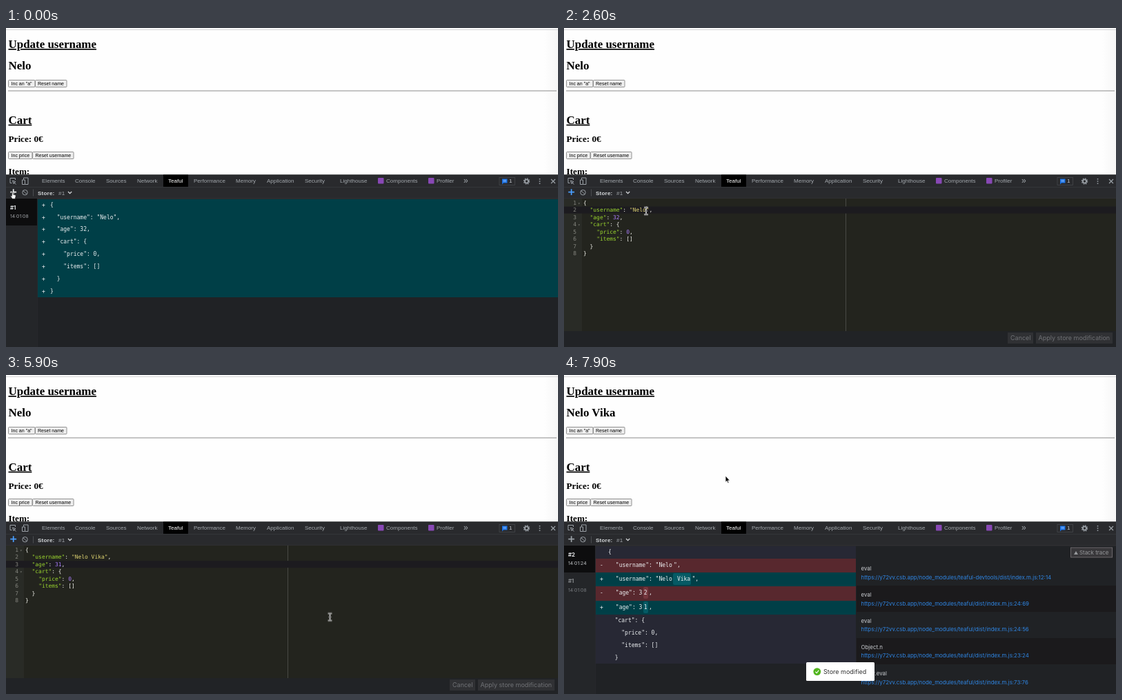
Recreate the animation shown at these times as an HTML page. Size 800 by 462 pixels, loop 8 s.

```html
<!DOCTYPE html>
<html lang="en">
<head>
<meta charset="utf-8">
<title>Store devtools</title>
<style>
html, body { margin: 0; width: 100%; height: 100%; overflow: hidden; background: #202124; }
#stage { position: relative; width: 800px; height: 462px; overflow: hidden; background: linear-gradient(90deg, #fefefe 780px, #f6f6f6); }
svg, .view { position: absolute; left: 0; top: 0; width: 800px; height: 462px; }

.page { font: bold 16.95px "Liberation Serif", serif; fill: #000; }
.u { text-decoration: underline; }
.page .h3 { font-size: 13.2px; }
.btn { font: 7.05px "Liberation Sans", sans-serif; }
.btn rect { fill: #efefef; stroke: #767676; stroke-width: .8; }
.tabs { font: 8.05px "Liberation Sans", sans-serif; fill: #a3a8ad; }
.ui { font: 7.9px Inter, sans-serif; }
.icon { fill: none; stroke: #9aa0a6; }

/* every timeline lasts one loop */
.t { animation: 8s step-end infinite; }
.editor { animation-name: editor; }
.before { animation-name: before; }
.after { animation-name: after; }
.saved { animation-name: saved; }
.add { animation-name: add; }
@keyframes editor { 0% { opacity: 0 } 11.25% { opacity: 1 } 90% { opacity: 0 } }
@keyframes before { 0% { opacity: 1 } 11.25% { opacity: 0 } 90% { opacity: 1 } 93.75% { opacity: 0 } }
@keyframes after { 0% { opacity: 0 } 93.75% { opacity: 1 } }
@keyframes saved { 0% { fill-opacity: 0 } 90% { fill-opacity: 1 } }
@keyframes add { 0% { stroke: #f1f3f4 } 11.25% { stroke: #4a9eff } 90% { stroke: #9aa0a6 } }

/* code editor */
.view { font: 8px "DejaVu Sans Mono", monospace; white-space: pre; }
.view.editor { font-size: 7.94px; }
.view > div { position: absolute; }
.bg { left: 0; top: 247px; width: 800px; height: 192px; background: linear-gradient(90deg, #292b26 26px, #23241e 0); }
.foot { left: 0; top: 439px; width: 800px; height: 23px; background: #212326; }
.margin { left: 408px; top: 247px; width: 1px; height: 192px; background: #484945; }
.nums, .code, .fold { top: 248.5px; line-height: 10.55px; }
.line, .caret { top: 247.7px; height: 10.55px; }
.nums { left: 0; width: 18px; text-align: right; color: #85867f; }
.fold { left: 20px; color: #6d6e68; font-size: 6px; }
.code { left: 28px; color: #f0f0ea; }
.code i { font-style: normal; color: #9bd62f; }
.code em { font-style: normal; color: #e0d572; }
.code u { text-decoration: none; color: #a97dfa; }
.cut { display: inline-block; overflow: hidden; vertical-align: top; height: 10.55px; }
.line { left: 0; width: 800px; background: #1c1b1f; animation-name: line; }
@keyframes line {
  0% { transform: translateY(73.85px) }
  31.25% { transform: translateY(10.55px) }
  56.25% { transform: translateY(21.1px) }
}
.caret { left: 28px; width: 1px; background: #f8f8f0; animation-name: caret, blink; }
@keyframes caret {
  0% { transform: translate(1ch, 73.85px) }
  31.25% { transform: translate(19ch, 10.55px) }
  35% { transform: translate(20ch, 10.55px) }
  37.5% { transform: translate(21ch, 10.55px) }
  40% { transform: translate(22ch, 10.55px) }
  42.5% { transform: translate(23ch, 10.55px) }
  45% { transform: translate(24ch, 10.55px) }
  56.25% { transform: translate(11ch, 21.1px) }
  61.25% { transform: translate(10ch, 21.1px) }
  66.25% { transform: translate(11ch, 21.1px) }
}
@keyframes blink {
  0% { opacity: 1 } 17.5% { opacity: 0 } 23.75% { opacity: 1 }
  30% { opacity: 0 } 31.25% { opacity: 1 } 51.25% { opacity: 0 }
  56.25% { opacity: 1 } 72.5% { opacity: 0 } 78.75% { opacity: 1 } 85% { opacity: 0 }
}
.typed { animation-name: typed; }
@keyframes typed {
  0%, 32.5% { width: 0; animation-timing-function: steps(5, end) }
  45%, 100% { width: 5ch }
}
.old { animation-name: old; }
.new { animation-name: new; }
@keyframes old { 0% { width: 1ch } 61.25% { width: 0 } }
@keyframes new { 0% { width: 0 } 66.25% { width: 1ch } }

/* diff */
.diff { left: 46px; top: 247.7px; width: 754px; color: #eceff1; }
.after .diff { width: 377px; }
.diff div { height: 17.85px; line-height: 17.85px; background: #272834; }
.diff b { display: inline-block; box-sizing: border-box; width: 18px; padding-left: 6px; font-weight: normal; }
.diff .plus { background: #003f47; }
.diff .w { height: 20.4px; line-height: 20.4px; }
.diff .minus { background: #58282e; }
.w span { padding: 4px 1.2px; border-radius: 2px; }
.plus .hi { background: #055a64; }
.minus .hi { background: #74363d; }

/* toast and pointer */
.toast { animation: toast 8s infinite; }
@keyframes toast {
  0%, 95% { opacity: 0; transform: translateY(14px); animation-timing-function: steps(2, end) }
  97.5%, 99.99% { opacity: 1; transform: none }
  100% { opacity: 0 }
}
.mouse { animation: move 8s infinite; }
@keyframes move {
  0%, 22.5% { transform: translate(10px, 242px); animation-timing-function: steps(5, end) }
  28.75%, 45% { transform: translate(119px, 265px); animation-timing-function: steps(3, end) }
  48.75%, 53.75% { transform: translate(92px, 274px); animation-timing-function: steps(2, end) }
  56.25%, 67.5% { transform: translate(84px, 275px); animation-timing-function: steps(5, end) }
  73.75% { transform: translate(469.5px, 350.5px); animation-timing-function: steps(3, end) }
  77.5% { transform: translate(560px, 399px); animation-timing-function: steps(4, end) }
  82.5%, 92.5% { transform: translate(719px, 456px); animation-timing-function: steps(5, end) }
  98.75%, 100% { transform: translate(236px, 151px) }
}
.hand { animation-name: hand; }
.beam { animation-name: beam; }
.arrow { animation-name: arrow; }
@keyframes hand { 0% { opacity: 1 } 23.75% { opacity: 0 } 81.25% { opacity: 1 } 90% { opacity: 0 } }
@keyframes beam { 0% { opacity: 0 } 23.75% { opacity: 1 } 78.75% { opacity: 0 } }
@keyframes arrow { 0% { opacity: 0 } 78.75% { opacity: 1 } 81.25% { opacity: 0 } 90% { opacity: 1 } }
</style>
</head>
<body>
<div id="stage">

<svg viewBox="0 0 800 462">
  <path d="M0 2.5H800" stroke="#d4d4d6"/>
  <g class="page">
    <text class="u" x="3.5" y="29">Update username</text>
    <text x="3.5" y="59.7" xml:space="preserve">Nelo<tspan class="t saved"> Vika</tspan></text>
    <text class="u" x="3.5" y="138.7">Cart</text>
    <text class="h3" x="3.5" y="165">Price: 0€</text>
    <text class="h3" x="3.5" y="211.5">Item:</text>
  </g>
  <path d="M3 91H798" stroke="#8b8b8b"/>
  <g class="btn">
    <rect x="3.5" y="75.5" width="38.5" height="10" rx="1"/><text x="7.5" y="83">Inc an "a"</text>
    <rect x="42.5" y="75.5" width="45.5" height="10" rx="1"/><text x="46" y="83">Reset name</text>
    <rect x="3.5" y="179.5" width="34.5" height="10" rx="1"/><text x="7.5" y="187">Inc price</text>
    <rect x="38.5" y="179.5" width="59.5" height="10" rx="1"/><text x="42.5" y="187">Reset username</text>
  </g>

  <rect y="212.5" width="800" height="249.5" fill="#202225"/>
  <rect y="212.5" width="800" height="34.5" fill="#292a2d"/>
  <path d="M0 230.5H800M0 247H800" stroke="#3a3b3e" stroke-width=".7"/>
  <rect x="228" y="212.5" width="36" height="17.5" fill="#000"/>
  <g class="tabs">
    <text x="52" y="224.4">Elements</text>
    <text x="100" y="224.4">Console</text>
    <text x="145" y="224.4">Sources</text>
    <text x="190" y="224.4">Network</text>
    <text x="235" y="224.4" fill="#fff">Teaful</text>
    <text x="272" y="224.4">Performance</text>
    <text x="333" y="224.4">Memory</text>
    <text x="378" y="224.4">Application</text>
    <text x="433" y="224.4">Security</text>
    <text x="484" y="224.4">Lighthouse</text>
    <text x="551" y="224.4">Components</text>
    <text x="624" y="224.4">Profiler</text>
    <text x="663" y="225" font-size="12">»</text>
    <text x="729" y="224.4" fill="#c6cacf">1</text>
    <text x="46" y="241.5" font-weight="bold" letter-spacing=".2" fill="#d5d8db">Store:</text>
    <text x="76" y="241.5" letter-spacing=".3">#1</text>
  </g>
  <g fill="#8848b5">
    <rect x="539" y="217" width="8.5" height="8.5" rx="1"/>
    <rect x="612" y="217" width="8.5" height="8.5" rx="1"/>
  </g>
  <rect x="715" y="216.5" width="22.5" height="11" fill="none" stroke="#45474b" stroke-width=".8"/>
  <path d="M719 218.5h7.5v6h-5.5l-2 2z" fill="#1a73e8"/>
  <path d="M720.5 220.5h4.5M720.5 222.3h4.5" stroke="#bcd6fb" stroke-width=".6"/>
  <g class="icon">
    <path d="M13.5 220v-2.5h-7.5v7h2.5M9.5 221l4.5 1.7-2 .9-.8 2zM12 224l2.5 2.5"/>
    <path d="M25.5 219.5v-2.5h6.5v9.5h-4M23.5 220h4v6.5h-4z"/>
    <circle cx="27.5" cy="238.2" r="3.7"/><path d="M25 235.7l5 5"/>
    <path d="M39.5 233.5v10" stroke="#4b4d51"/>
    <path d="M90 237l2.6 2.6 2.6-2.6" stroke="#d5d8db" stroke-width="1.3"/>
    <circle cx="754.5" cy="222" r="2.6" stroke-width="1.8"/>
    <circle cx="754.5" cy="222" r="4.1" stroke-width="1.2" stroke-dasharray="1.7 1.52"/>
    <path d="M773.5 218v1.6M773.5 221.2v1.6M773.5 224.4v1.6" stroke-width="1.6"/>
    <path d="M790 219l6 6M796 219l-6 6" stroke-width="1.2"/>
    <path class="t add" d="M10.7 233.3v8.8M6.3 237.7h8.8" stroke-width="1.7"/>
  </g>

  <rect y="247" width="45" height="215" fill="#242629"/>
  <path d="M45.5 247V462" stroke="#2c2e31" stroke-width=".6"/>
  <rect y="247" width="45" height="39" fill="#0d0d0e"/>
  <g class="ui t before">
    <text x="6" y="262.8" font-weight="bold" fill="#e4e6e8">#1</text>
    <text x="6" y="275.4" font-size="6.8" fill="#a4a7ab">14:01:08</text>
  </g>
  <g class="ui t after">
    <text x="6" y="262.8" font-weight="bold" fill="#e4e6e8">#2</text>
    <text x="6" y="275.4" font-size="6.8" fill="#c4c7ca">14:01:24</text>
    <text x="6" y="301" font-weight="bold" fill="#85888c">#1</text>
    <text x="6" y="313.7" font-size="6.8" fill="#7a7d81">14:01:08</text>
    <path d="M424 305h376v38H424zM424 381h376v38H424z" fill="#1b1a1c"/>
    <rect x="734.5" y="250" width="60" height="14" fill="#38373a" stroke="#6a666a"/>
    <path d="M739 260l3-5 3 5z" fill="#97999c"/>
    <text x="747" y="260.2" fill="#97999c">Stack trace</text>
    <g fill="#c9ccd0">
      <text x="430.5" y="282.8">eval</text>
      <text x="430.5" y="320.8">eval</text>
      <text x="430.5" y="358.5">eval</text>
      <text x="430.5" y="396.9">Object.n</text>
      <text x="430.5" y="434.9">Array.eval</text>
    </g>
    <g fill="#2f86e4">
      <text x="430.5" y="295.5">https://y72vv.csb.app/node_modules/teaful-devtools/dist/index.m.js:12:14</text>
      <text x="430.5" y="333.5">https://y72vv.csb.app/node_modules/teaful/dist/index.m.js:24:69</text>
      <text x="430.5" y="371">https://y72vv.csb.app/node_modules/teaful/dist/index.m.js:24:56</text>
      <text x="430.5" y="409.2">https://y72vv.csb.app/node_modules/teaful/dist/index.m.js:23:24</text>
      <text x="430.5" y="447.5">https://y72vv.csb.app/node_modules/teaful/dist/index.m.js:73:76</text>
    </g>
  </g>
</svg>

<div class="view t before"><div class="diff"><div class="plus"><b>+</b>{</div><div class="plus"><b>+</b>  "username": "Nelo",</div><div class="plus"><b>+</b>  "age": 32,</div><div class="plus"><b>+</b>  "cart": {</div><div class="plus"><b>+</b>    "price": 0,</div><div class="plus"><b>+</b>    "items": []</div><div class="plus"><b>+</b>  }</div><div class="plus"><b>+</b>}</div></div></div>

<div class="view t after"><div class="diff"><div><b> </b>{</div><div class="w minus"><b>-</b><span>  "username": "Nelo</span><span>",</span></div><div class="w plus"><b>+</b><span>  "username": "Nelo</span><span class="hi"> Vika</span><span>",</span></div><div class="w minus"><b>-</b><span>  "age": 3</span><span class="hi">2</span><span>,</span></div><div class="w plus"><b>+</b><span>  "age": 3</span><span class="hi">1</span><span>,</span></div><div><b> </b>  "cart": {</div><div><b> </b>    "price": 0,</div><div><b> </b>    "items": []</div><div><b> </b>  }</div></div></div>

<div class="view t editor"><div class="bg"></div><div class="foot"></div><div class="margin"></div><div class="t line"></div><div class="nums">1
2
3
4
5
6
7
8</div><div class="fold">▾


▾</div><div class="code">{
  <i>"username"</i>: <em>"Nelo<span class="cut t typed"> Vika</span>"</em>,
  <i>"age"</i>: <u>3<span class="cut t old">2</span><span class="cut t new">1</span></u>,
  <i>"cart"</i>: {
    <i>"price"</i>: <u>0</u>,
    <i>"items"</i>: []
  }
}</div><div class="t caret"></div></div>

<svg viewBox="0 0 800 462">
  <g class="t editor" font-family="Inter, sans-serif" font-size="9" fill="#707276">
    <path d="M643 441h37v16h-37zM684 441h111v16H684z" fill="#303134"/>
    <text x="647" y="452.4">Cancel</text>
    <text x="687.5" y="452.4">Apply store modification</text>
  </g>
  <g class="toast">
    <rect x="351" y="416" width="99" height="27" rx="1.5" fill="#fff"/>
    <circle cx="366.8" cy="429.6" r="5.4" fill="#52b51f"/>
    <path d="M364.3 429.7l1.9 2 3.1-4" fill="none" stroke="#fff" stroke-width="1.1"/>
    <text x="376" y="432.9" font-family="Inter, sans-serif" font-size="9" fill="#333">Store modified</text>
  </g>
  <g class="mouse">
    <path class="t hand" d="M-1.6 1.5v-5.5q.9-1.4 1.8 0v3l3.2.8q1 .3.8 1.6l-.8 4h-4.4l-2.6-4.2q.6-1.2 2 .3z" fill="#fff" stroke="#111" stroke-width=".7"/>
    <g class="t beam" fill="none">
      <path d="M-2.8-5.3h2q.8 0 .8 1v8.6q0 1-.8 1h-2M2.8-5.3h-2q-.8 0-.8 1M0 4.3q0 1 .8 1h2M-1.5 0h3" stroke="#fff" stroke-width="2"/>
      <path d="M-2.8-5.3h2q.8 0 .8 1v8.6q0 1-.8 1h-2M2.8-5.3h-2q-.8 0-.8 1M0 4.3q0 1 .8 1h2M-1.5 0h3" stroke="#222" stroke-width=".7"/>
    </g>
    <path class="t arrow" d="M-2-5v9.3l2.1-1.9 1.5 3.4 1.5-.7-1.5-3.2h2.8z" fill="#000" stroke="#fff" stroke-width=".8"/>
  </g>
</svg>

</div>
</body>
</html>
```
